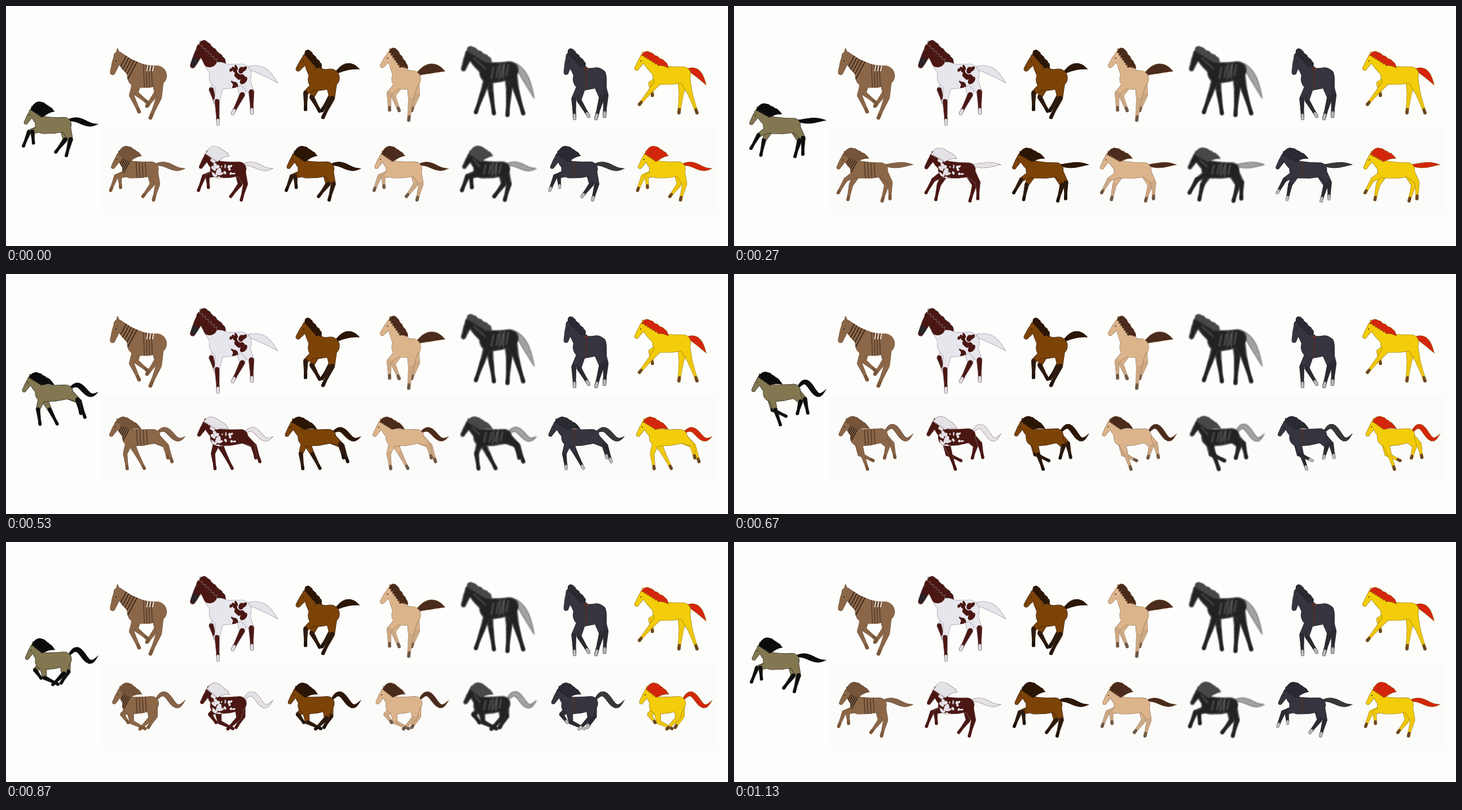
An HTML page with a canvas for the animation above (1160 ms loop, 1280 px wide and 427 px high).

```html
<!DOCTYPE html>
<html lang="en">
<head>
<meta charset="utf-8">
<title>Galloping horses</title>
<style>
  html, body { margin: 0; width: 100%; height: 100%; overflow: hidden; background: #fdfdfb; }
  canvas { display: block; width: 100vw; height: 100vh; }
</style>
</head>
<body>
<canvas id="stage" width="1280" height="427"></canvas>
<script>
const ctx = document.getElementById('stage').getContext('2d');
const TAU = Math.PI * 2;
const add = (p, x, y) => [p[0] + x, p[1] + y];
const mix = (a, b, u) => [a[0] + (b[0] - a[0]) * u, a[1] + (b[1] - a[1]) * u];
const points = s => s.split(' ').map(p => p.split(',').map(Number));

// ---------- shapes ----------

// Chain of joints, each with its own radius.
function limb(joints, radii) {
  const path = new Path2D();
  joints.forEach(([x, y], i) => {
    const r = radii[i];
    path.moveTo(x + r, y);
    path.arc(x, y, r, 0, TAU);
    if (!i) return;
    const [px, py] = joints[i - 1], pr = radii[i - 1], len = Math.hypot(x - px, y - py) || 1;
    const nx = (py - y) / len, ny = (x - px) / len;
    path.moveTo(px - nx * pr, py - ny * pr);
    path.lineTo(x - nx * r, y - ny * r);
    path.lineTo(x + nx * r, y + ny * r);
    path.lineTo(px + nx * pr, py + ny * pr);
    path.closePath();
  });
  return path;
}

function union(paths) {
  const all = new Path2D();
  paths.forEach(p => all.addPath(p));
  return all;
}

// Tapered lock of hair from root to tip; bend(u) lifts it along the way.
function lock(root, tip, width, bend) {
  const n = 14, joints = [], radii = [];
  for (let i = 0; i <= n; i++) {
    const u = i / n;
    joints.push(add(mix(root, tip, u), 0, -bend(u)));
    radii.push(width * (.35 * (1 - u) + .8 * Math.sin(Math.PI * u)));
  }
  return limb(joints, radii);
}

function paint(path, color) {
  ctx.stroke(path);
  ctx.fillStyle = color;
  ctx.fill(path);
}

// ---------- horse ----------

// Hip, knee, fetlock and hoof; the knee bows out as the leg folds.
function leg(hip, hoof, bone, maxBow, side) {
  const dx = hoof[0] - hip[0], dy = hoof[1] - hip[1], len = Math.hypot(dx, dy);
  const bow = side * Math.min(maxBow, Math.sqrt(Math.max(0, bone * bone - len * len / 4)));
  const knee = add(mix(hip, hoof, .48), dy / len * bow, -dx / len * bow);
  return [hip, knee, mix(knee, hoof, .65), hoof];
}

// Hooves come as far fore, near fore, far hind, near hind.
function horse(pose, coat) {
  const { muzzle, poll, chest, rump, hooves, tail, size = 1, mane, curl = () => 4 } = pose;
  const { fill, line, hair, tailColor = hair, sock = fill, hoof = sock, blur, bush = 4.5, marks } = coat;
  const chestY = chest[1] - 13 * size, thick = Math.sqrt(size);

  const legs = hooves.map((end, i) => i < 2
    ? leg(add(chest, -2 * size, 5 * size), end, 26 * size, 12, -1)
    : leg(add(rump, size, size), end, 30 * size, 9, 1));
  const radii = legs.map((_, i) => (i < 2 ? [6.5, 3.3, 2.1, 2.2] : [10, 3.8, 2.2, 2.3]).map(r => r * thick));
  const whole = legs.map((joints, i) => limb(joints, radii[i]));
  const lower = i => {
    const [, knee, ankle, end] = legs[i];
    ctx.fillStyle = sock;
    ctx.fill(limb([knee, ankle, end], radii[i].slice(1)));
    ctx.fillStyle = hoof;
    ctx.fill(limb([mix(ankle, end, .5), end], [2.3, 2.7]));
  };
  const trunk = union([
    limb([chest, add(mix(chest, rump, .5), 0, size), rump], [15 * size, 14 * size, 12.5 * size]),
    limb([poll, mix(poll, chest, .45), add(chest, 0, -3 * size)], [5.5 * size, 8.5 * size, 12.5 * size]),
    limb([poll, mix(poll, muzzle, .45), muzzle], [5 * size, 4.6 * size, 3 * size]),
    limb([poll, add(poll, -size, -9 * size)], [3 * size, .5])
  ]);

  ctx.save();
  ctx.filter = blur ? `blur(${blur}px)` : 'none';
  ctx.strokeStyle = line;
  ctx.lineWidth = 1.2;
  if (tail) paint(lock(add(rump, 9 * size, -8 * size), tail, bush * size, u => curl(u)), tailColor);
  for (const i of [0, 2]) {
    paint(whole[i], fill);
    lower(i);
  }
  paint(union([trunk, whole[1], whole[3]]), fill);
  lower(1);
  lower(3);
  if (marks) {
    ctx.save();
    ctx.clip(trunk);
    marks(pose, size);
    ctx.restore();
  }
  if (mane) {
    const end = mix(poll, [chest[0] + 2, chestY], .75), locks = 7;
    ctx.strokeStyle = line;
    paint(union(Array.from({ length: locks }, (_, i) => {
      const root = mix(add(poll, -1, -4 * size), end, i / (locks - 1));
      return lock(root, add(root, ...mane), 4 * thick, u => 5 * Math.sin(Math.PI * u) + (i % 2) * 2 * u);
    })), hair);
  }
  ctx.fillStyle = '#18120e';
  ctx.fill(limb([add(mix(poll, muzzle, .3), -1, 0)], [1]));
  ctx.restore();
}

// ---------- markings ----------

function stroke(color, width, from, to) {
  ctx.strokeStyle = color;
  ctx.lineWidth = width;
  ctx.beginPath();
  ctx.moveTo(...from);
  ctx.lineTo(...to);
  ctx.stroke();
}

// Bands across the body, spread from one point to another.
function bands(color, width, count, from, to, reach, slant = 0) {
  for (let i = 0; i < count; i++) {
    const p = mix(from, to, (i + .5) / count);
    stroke(color, width, add(p, -slant, reach), add(p, slant, -reach));
  }
}

// Seeded ragged patches around a centre.
function scatter(color, count, [x, y], w, h, size) {
  const rnd = k => { const v = Math.sin(k * 12.9898 + 4.1) * 43758.5453; return v - Math.floor(v); };
  ctx.fillStyle = color;
  for (let i = 0; i < count; i++) {
    ctx.beginPath();
    ctx.ellipse(x + w * (rnd(i) * 2 - 1), y + h * (rnd(i + 50) * 2 - 1),
      size * (.4 + rnd(i + 100)), size * (.3 + .6 * rnd(i + 150)), rnd(i) * 3, 0, TAU);
    ctx.fill();
  }
}

const joints = ({ poll, chest, rump }, size) => {
  bands('#3a281c', 1.8, 5, mix(poll, chest, .2), mix(poll, chest, .75), 13 * size, 7 * size);
  bands('#4f3626', 1.4, 4, mix(chest, rump, .2), mix(chest, rump, .8), 17 * size, -1);
};
const slits = (pose, size) => {
  joints(pose, size);
  const top = add(pose.rump, -9 * size, -12 * size);
  bands('#fbf8f4', 1.6, 3, add(top, -6, 0), add(top, 10, 0), 9, 2);
};
const paleShoulder = ({ poll, chest, rump }) => {
  scatter('#e4e1e7', 28, add(mix(poll, chest, .7), 1, 2), 9, 22, 4);
  scatter('#e4e1e7', 9, mix(chest, rump, .4), 12, 8, 3);
};
const darkHead = ({ poll, muzzle, chest, rump }) => {
  ctx.fillStyle = '#4a1713';
  ctx.fill(limb([mix(poll, chest, .4), poll, muzzle], [14, 12, 9]));
  ctx.fillStyle = '#292427';
  ctx.fill(limb([mix(poll, muzzle, .8)], [8]));
  scatter('#4a1713', 16, add(rump, -4, 4), 17, 20, 6);
};
const sheen = ({ poll, chest, rump }, size) => {
  bands('#74747488', 3, 4, chest, rump, 9 * size, 2);
  bands('#a0a0a077', 2, 2, mix(chest, rump, .4), mix(chest, rump, .8), 12 * size, 1);
  stroke('#66666688', 3, mix(poll, chest, .2), mix(poll, chest, .8));
};
const girth = ({ chest, rump }, size) => {
  const p = mix(chest, rump, .2);
  stroke('#56302a', 1.8 * size, add(p, 0, -15 * size), add(p, -1, 15 * size));
  stroke('#56302a', 3 * size, add(p, -4 * size, -14 * size), add(p, 4 * size, -14 * size));
};

// ---------- coats ----------

const olive = { fill: '#837751', line: '#1c1a14', hair: '#0c0c0f', sock: '#0e0e10' };
const wood = { fill: '#8b6748', line: '#6b4c33', hair: '#76543a', tailColor: '#85624a', hoof: '#7a5638', marks: joints };
const pinto = { fill: '#4a1713', line: '#8d7777', hair: '#e4e2e7', marks: paleShoulder };
const bay = { fill: '#7c4307', line: '#2d1604', hair: '#2b1606', sock: '#2a1a10', hoof: '#1b120c' };
const cream = { fill: '#dcb48c', line: '#8a6a4a', hair: '#4a2b1c', sock: '#cda884', hoof: '#6b5848' };
const smoke = { fill: '#222', line: '#444', hair: '#484848', tailColor: '#a2a2a2', blur: .9, marks: sheen };
const slate = { fill: '#34353f', line: '#1d1d22', hair: '#2a2b32', tailColor: '#363937', sock: '#2b2b31', hoof: '#b9b7b6', marks: girth };
const gold = { fill: '#f3cd0a', line: '#8a6c10', hair: '#d3260d', sock: '#eec60e', hoof: '#6a4526' };
const paleBody = { fill: '#e8e6ed', line: '#8f8b94', hair: '#4a1713', tailColor: '#e6e4ea', sock: '#4a1713', hoof: '#e0dde4', marks: darkHead };

const runners = [wood, pinto, bay, cream, smoke, slate, gold];

// Muzzle, poll, chest, rump, four hooves and the tip of the tail.
const model = (coat, size, mane, skeleton) => {
  const [muzzle, poll, chest, rump, ...rest] = points(skeleton);
  return [{ muzzle, poll, chest, rump, hooves: rest.slice(0, 4), tail: rest[4], size,
    mane: mane && [mane, mane * .3], curl: u => 7 * Math.sin(Math.PI * u) }, coat];
};
const models = [
  model({ ...wood, marks: slits }, 1.4, 0, '189,118 199,89 236,124 267,124 250,171 236,188 250,178 256,199'),
  model(paleBody, 1.5, 14, '331,106 346,75 383,125 416,122 371,172 376,210 402,191 436,190 481,136'),
  model(bay, 1.28, 7, '518,112 533,92 555,131 575,128 556,187 531,184 560,186 562,198 626,112'),
  model({ ...cream, bush: 7 }, 1.2, 14, '667,106 682,87 702,130 720,130 697,186 680,185 719,186 714,203 778,116'),
  model(smoke, 1.2, 9, '811,112 821,85 858,119 893,114 865,191 833,189 889,194 917,191 936,163'),
  model({ ...slate, bush: 2 }, 1.3, 5, '993,118 1000,90 1025,130 1047,126 1033,196 1008,200 1061,196 1046,200 1064,148'),
  model({ ...gold, bush: 5.5 }, 1.1, 18, '1118,111 1130,92 1163,123 1200,122 1146,159 1123,175 1193,190 1225,190 1241,140')
];

// ---------- gallop ----------

const STEPS = 34;
const FORE_LOOP = points('31,249 36,262 68,268 93,265 84,243 47,244');
const HIND_LOOP = points('107,266 110,267 139,257 129,247 97,251 80,256');

// Position on a closed smooth loop, phase in turns.
function around(loop, phase) {
  const n = loop.length, s = (phase - Math.floor(phase)) * n, i = Math.floor(s), u = s - i;
  const [a, b, c, d] = [n - 1, 0, 1, 2].map(k => loop[(i + k) % n]);
  return [0, 1].map(j => b[j] + .5 * u * (c[j] - a[j]
    + u * (2 * a[j] - 5 * b[j] + 4 * c[j] - d[j] + u * (3 * (b[j] - c[j]) + d[j] - a[j]))));
}

function gallop(step) {
  const wave = (peak, turns = 1) => Math.cos(TAU * turns * (step - peak) / STEPS);
  const turn = lag => (step - lag) / STEPS;
  const nod = -.5 - 3.5 * wave(10.5), bounce = -1.7 - 2.2 * wave(24);
  return {
    muzzle: [34.5 + nod, 207 - wave(24)],
    poll: [46 + nod, 188 - wave(24)],
    chest: [67, 212],
    rump: [104.5 + 1.7 * wave(14), 212 + bounce],
    hooves: [around(FORE_LOOP, turn(0)), around(FORE_LOOP, turn(6)),
             around(HIND_LOOP, turn(3.5)), around(HIND_LOOP, turn(0))],
    mane: [22, -4 - 5 * wave(0)],
    tail: [162, 207 - 4 * wave(7, 2)],
    curl: u => (5 + 6 * wave(23)) * Math.sin(TAU * u)
  };
}

function draw(step) {
  ctx.fillStyle = '#fdfdfb';
  ctx.fillRect(0, 0, 1280, 427);
  ctx.fillStyle = '#fbfbfa';
  ctx.fillRect(169, 216, 1092, 155);
  models.forEach(([pose, coat]) => horse(pose, coat));
  const pose = gallop(step);
  horse(pose, olive);
  runners.forEach((coat, i) => {
    ctx.save();
    ctx.translate(154.5 + i * 155.7, 79);
    horse(pose, coat);
    ctx.restore();
  });
}

const LOOP = 1160;
let shown = -1;
function tick() {
  const step = Math.floor((performance.now() % LOOP + 3.4) / 33.34) % STEPS;
  if (step !== shown) draw(shown = step);
  requestAnimationFrame(tick);
}
tick();
</script>
</body>
</html>
```
